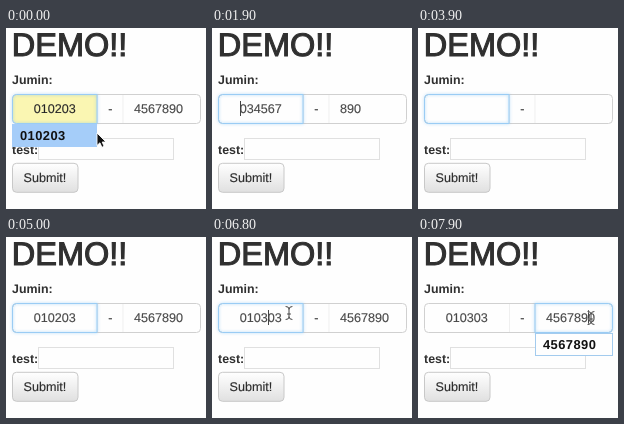
An HTML page for the animation above (8 s loop, 200 by 181 pixels).

```html
<!DOCTYPE html>
<html lang="en">
<head>
<meta charset="utf-8">
<title>Split input demo</title>
<style>
html, body { margin: 0; width: 100%; height: 100%; overflow: hidden; background: #fefefe; }
svg { display: block; width: 200px; height: 181px; font: 12.6px "Liberation Sans", Arial, sans-serif; text-rendering: geometricPrecision; }
text { white-space: pre; }
.head { font-size: 32.5px; fill: #303030; stroke: #303030; stroke-width: 1.1px; }
.label { font-size: 12.4px; font-weight: 700; fill: #303030; }
.value { fill: #484848; stroke: #484848; stroke-width: .15px; }
.box { fill: #fefefe; stroke: #d0d0d0; }
.focus { fill: none; stroke: #9accf4; filter: drop-shadow(0 0 1.5px rgba(100, 180, 240, .7)); }
.list rect { fill: #fefefe; stroke: #a3cbee; }
.list text { font-size: 12.9px; font-weight: 700; letter-spacing: .45px; fill: #111; }
.list.hover rect { fill: #a5cdf9; stroke: #a5cdf9; }
</style>
</head>
<body>
<svg viewBox="0 0 200 181">
  <defs>
    <linearGradient id="shade" x1="0" y1="0" x2="0" y2="1">
      <stop offset="0" stop-color="#fff"/>
      <stop offset="1" stop-color="#e0e0e0"/>
    </linearGradient>
    <path id="bar" d="M-3-6.5Q0-6.5 0-4V4Q0 6.5-3 6.5M3-6.5Q0-6.5 0-4M0 4Q0 6.5 3 6.5M-1.5 1H1.5"/>
  </defs>
  <text class="head" x="5.8" y="28.3">DEMO!!</text>
  <text class="label" x="6" y="56">Jumin:</text>

  <rect class="box" x="6.5" y="66.5" width="188" height="29" rx="4"/>
  <path d="M91.5 67V95M117 67V95" stroke="#efefef"/>
  <path id="tint" d="M91 67H10.5a3.5 3.5 0 0 0-3.5 3.5V91.5a3.5 3.5 0 0 0 3.5 3.5H91z" fill="#faf6b2"/>
  <path id="focusL" class="focus" d="M91 66.5H10.5a4 4 0 0 0-4 4V91.5a4 4 0 0 0 4 4H91z"/>
  <path id="focusR" class="focus" d="M117 66.5H190.5a4 4 0 0 1 4 4V91.5a4 4 0 0 1-4 4H117z"/>
  <text id="left" class="value" x="27.8" y="85"></text>
  <text class="value" x="102.2" y="85">-</text>
  <text id="right" class="value" x="128" y="85"></text>
  <path id="caret" d="M0 73V88" stroke="#444"/>

  <text class="label" x="6" y="125.5">test:</text>
  <rect class="box" x="32.5" y="110.5" width="135" height="21" style="stroke:#e0e0e0"/>
  <rect x="6.5" y="135.3" width="65.5" height="29" rx="4" fill="url(#shade)" stroke="#c8c8c8"/>
  <text x="17.6" y="154" fill="#2c2c2c" stroke="#2c2c2c" stroke-width=".15">Submit!</text>

  <g id="listL" class="list">
    <rect x="6.5" y="96.5" width="84" height="22"/>
    <text x="14" y="112">010203</text>
  </g>
  <g id="listR" class="list">
    <rect x="117.5" y="96.5" width="77" height="22"/>
    <text x="125" y="112">4567890</text>
  </g>

  <g id="pointer">
    <circle id="ring" r="15" fill="none" stroke="#222" stroke-width="1.5"/>
    <g id="beam" fill="none" stroke-linecap="round">
      <use href="#bar" stroke="#fff" stroke-width="2.2" opacity=".5"/>
      <use href="#bar" stroke="#444"/>
    </g>
    <path id="arrow" d="M0 0V12.5L2.9 9.8 4.9 14.3 7.1 13.3 5.2 9H9z" fill="#111" stroke="#fff" stroke-width=".9"/>
  </g>
</svg>
<script>
const LOOP = 8000, DIGIT = 7.007, FULL = '0102034567890', EDITED = '0103034567890';
const el = id => document.getElementById(id);
const show = (id, on) => { el(id).style.display = on ? '' : 'none'; };
const within = (t, ...spans) => spans.some(([a, b]) => t >= a && t < b);

// Pointer stops: time, x, y
const stops = [
  [0, 91, 105], [100, 91, 105], [300, 80, 81], [450, 80, 81], [600, 28, 78],
  [5150, 28, 78], [5500, 57, 79], [6750, 57, 79], [6800, 77, 76],
  [7400, 173, 81], [8000, 173, 81]
];

function pointerAt(t) {
  const i = Math.max(1, stops.findIndex(s => s[0] > t));
  const [a, b] = [stops[i - 1], stops[i]];
  const p = (t - a[0]) / (b[0] - a[0]);
  const e = p * p * (3 - 2 * p);
  return [a[1] + (b[1] - a[1]) * e, a[2] + (b[2] - a[2]) * e];
}

// Forward deletes, one key every 200 ms
function deleted(t) {
  if (t < 1200) return 0;
  if (t < 2100) return Math.floor((t - 1200) / 200) + 1;
  return Math.min(13, Math.floor((t - 2100) / 200) + 6);
}

function values(t) {
  const split = s => [s.slice(0, 6), s.slice(6)];
  if (t < 4300) return split(FULL.slice(deleted(t)));
  if (t < 4500) return ['010203', ''];
  if (t < 6200) return split(FULL);
  if (t < 6300) return ['01003', '4567890'];
  if (t < 6500) return split('010034567890');
  if (t < 6600) return ['0103034', '567890'];
  return split(EDITED);
}

function caretX(t) {
  const left = n => 28 + n * DIGIT;
  if (within(t, [600, 1100], [1200, 3900], [4300, 4900])) return left(0);
  if (within(t, [5600, 6100], [6500, 7100])) return left(4);
  if (within(t, [6200, 6500])) return left(3);
  if (t >= 7500) return 128 + 6 * DIGIT;
  return null;
}

function draw(t) {
  const [l, r] = values(t);
  el('left').textContent = l;
  el('right').textContent = r;

  const hover = t < 200;
  show('tint', hover);
  el('left').style.fill = hover ? '#222' : '';
  el('listL').classList.toggle('hover', hover);
  show('listL', within(t, [0, 1200], [5600, 6200]));
  show('listR', t >= 7600);
  show('focusL', t < 7500);
  show('focusR', t >= 7500);

  const cx = caretX(t);
  show('caret', cx !== null);
  if (cx !== null) el('caret').setAttribute('transform', `translate(${Math.round(cx) + .5} 0)`);

  const [x, y] = pointerAt(t);
  el('pointer').setAttribute('transform', `translate(${x.toFixed(2)} ${y.toFixed(2)})`);
  show('pointer', !within(t, [1200, 5200], [6200, 6800]));
  show('arrow', hover);
  show('beam', !hover);
  show('ring', within(t, [600, 1000], [5600, 5900], [7500, 7900]));
}

const start = performance.now();
function tick() {
  draw((performance.now() - start) % LOOP);
  requestAnimationFrame(tick);
}
tick();
</script>
</body>
</html>
```
